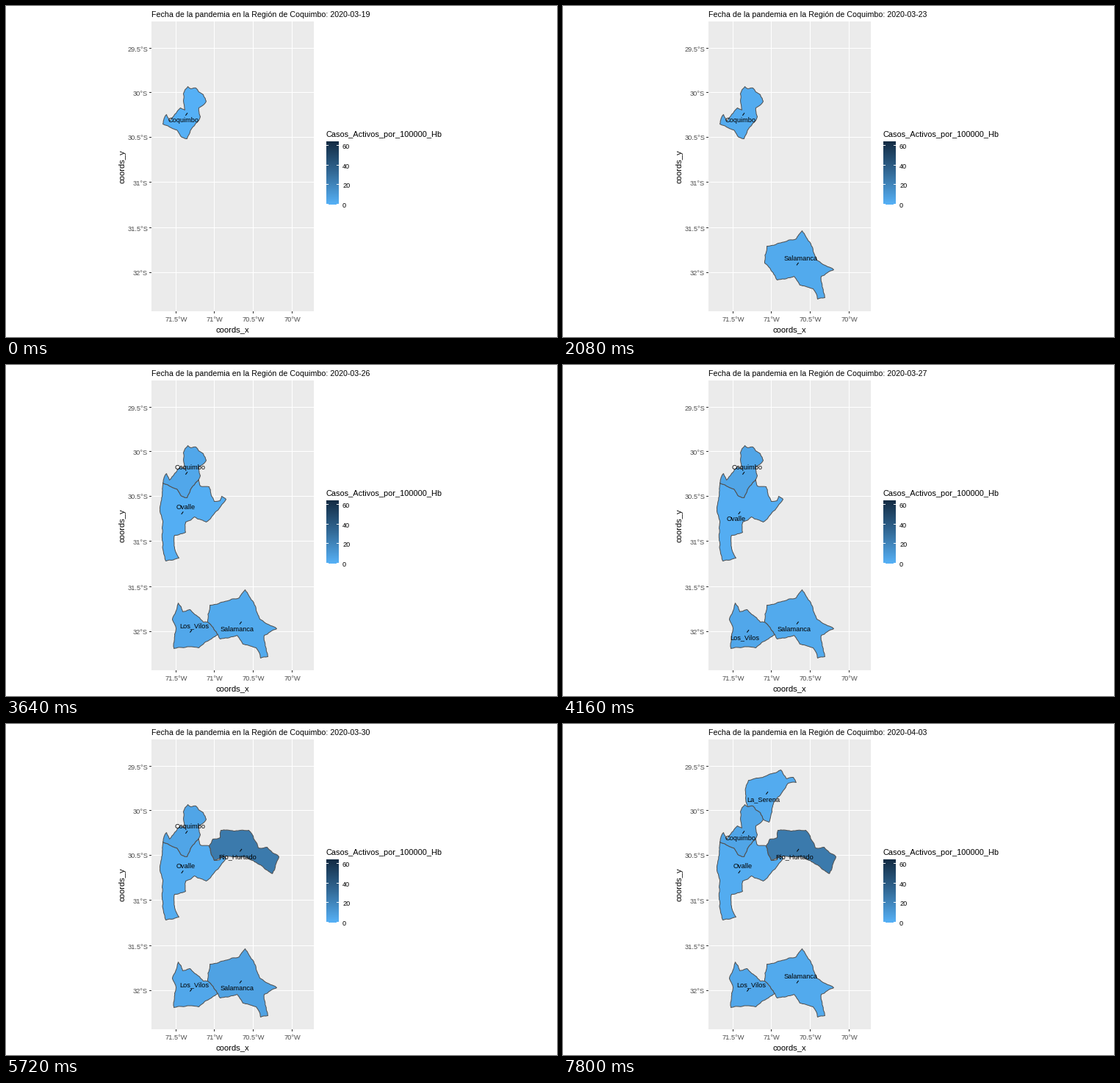
A matplotlib script that plays this animation: 750 px wide and 450 px high, repeating every 8000 ms.

```python
import numpy as np
import matplotlib.pyplot as plt
from matplotlib.animation import FuncAnimation
from matplotlib.colors import LinearSegmentedColormap
from matplotlib.patches import Polygon, Rectangle

W, H, DPI = 750, 450, 100
STEP, DAY, LOOP = 40, 520, 8000
PX = 72 / DPI
MAX_RATE = 64

plt.rcParams["font.family"] = "Liberation Sans"
fig = plt.figure(figsize=(W / DPI, H / DPI), dpi=DPI, facecolor="white")
ax = fig.add_axes([0, 0, 1, 1])
ax.axis("off")

cmap = LinearSegmentedColormap.from_list("rate", ["#56B1F7", "#336B98", "#132B43"])


def text(x, y, s, size, color="black", ha="left", **kw):
    return ax.text(x, y, s, size=size * PX, color=color, ha=ha,
                   va=kw.pop("va", "baseline"), **kw)


def box(x, y, w, h, color, z=1):
    ax.add_patch(Rectangle((x, y), w, h, fc=color, lw=0, zorder=z, antialiased=False))


def roughen(pts):
    """Fractal coastline; the shift depends on place only, so shared edges match."""
    def split(a, b):
        size = np.hypot(*(b - a))
        if size < 3:
            return [a]
        m = (a + b) / 2
        k = m @ [12.99, 78.23]
        m = m + min(0.07 * size, 1.2) * np.array([np.sin(k), np.cos(1.7 * k)])
        return split(a, m) + split(m, b)

    pts = np.array(pts, float)
    edges = zip(pts, np.roll(pts, -1, axis=0))
    return np.array([p for a, b in edges for p in split(a, b)]) + 0.5


class Commune:
    """Area and label; sides says per day, from the first, if the label is (a)bove or (b)elow."""

    def __init__(self, name, pts, anchor, first, sides, rate):
        self.anchor, self.first, self.sides, self.rate = anchor, first, sides, rate
        x, y = anchor
        self.area = ax.add_patch(Polygon(roughen(pts), ec="#505050", lw=PX,
                                         zorder=3, snap=False))
        self.tick, = ax.plot([x - 1, x + 1], [y + 1.5, y - 1.2], color="black",
                             lw=PX, zorder=4)
        self.label = text(x, y, name, 9.2, ha="center", zorder=5)

    def show(self, day):
        age = day - self.first
        for part in (self.area, self.tick, self.label):
            part.set_visible(age >= 0)
        if age >= 0:
            s = 1 if self.sides[age] == "b" else -1
            x, y = self.anchor
            self.label.set_position((x - 4.5 * s, y + 8 * s + 3.3))
            self.area.set_facecolor(cmap(self.rate(age) / MAX_RATE))


# Panel, grid and axes
box(198, 21, 221, 394, "#EBEBEB")
for k in range(4):
    x = int(231 + 52.7 * k)
    box(x, 21, 1, 394, "white")
    box(x, 415, 1, 3, "#333333")
    text(x + 0.5, 429.3, f"{71.5 - k / 2:g}°W", 9.3, "#4D4D4D", "center")
for k in range(6):
    y = int(57 + 60.4 * k + 0.15 * k * k)
    box(198, y, 221, 1, "white")
    box(195, y, 3, 1, "#333333")
    text(193, y + 4.5, f"{29.5 + k / 2:g}°S", 9.3, "#4D4D4D", "right")
text(308.5, 443, "coords_x", 11.2, ha="center")
text(158, 218.5, "coords_y", 11.2, ha="center", va="center", rotation=90)
title = text(198, 15, "", 10.58)

# Colour bar
text(435, 178, "Casos_Activos_por_100000_Hb", 11)
ax.imshow(np.linspace(1, 0, 256)[:, None], cmap=cmap, aspect="auto",
          extent=(436, 453, 270, 184), zorder=2)
for v in range(0, 61, 20):
    y = 269.6 - 1.34 * v
    for x in (436, 450):
        box(x, int(y), 3, 1, "white", 3)
    text(458, y + 4.5, str(v), 9.2)

# Borders shared by two neighbours
south_bay = [(213, 160), (232, 168), (239, 178), (246, 180), (253, 165), (262, 155)]
north_bay = [(251, 112), (258, 111), (268, 120), (272, 129)]
sierra = [(276, 165), (283, 185)]
coast_range = [(274, 349), (288, 366)]

ovalle = south_bay + [(264, 164)] + sierra + [
    (291, 184), (293, 178), (299, 182), (286, 198), (272, 213), (256, 206),
    (244, 213), (244, 227), (229, 231), (229, 249), (235, 262), (217, 266),
    (213, 241), (213, 214), (209, 198), (212, 178)]
serena = north_bay + [
    (280, 133), (286, 107), (298, 92), (306, 80), (317, 79), (313, 72),
    (304, 74), (296, 62), (280, 68), (252, 76), (248, 92)]
coquimbo = [(218, 147), (222, 156), (237, 138), (243, 141), (241, 119),
            (247, 109)] + north_bay + [(262, 138), (264, 150)] + south_bay[::-1]
hurtado = sierra + [
    (300, 179), (327, 181), (343, 190), (362, 203), (371, 180), (355, 167),
    (343, 168), (330, 144), (292, 144), (291, 154), (281, 156)]
vilos = coast_range + [
    (279, 372), (262, 384), (228, 385), (231, 358), (226, 346), (234, 323),
    (240, 335), (250, 332), (268, 349)]
salamanca = coast_range + [
    (291, 372), (314, 367), (322, 379), (340, 384), (346, 398), (356, 396),
    (351, 367), (368, 358), (345, 345), (337, 323), (325, 305), (317, 316),
    (277, 326)]

communes = [
    Commune("Ovalle", ovalle, (240, 201), 5, "bbabbbabbaa",
            lambda age: min(0.9 + 0.3 * age, 2.6)),
    Commune("La_Serena", serena, (277.7, 93.7), 12, "aabb",
            lambda age: 0.5 + 0.8 * age),
    Commune("Coquimbo", coquimbo, (245.7, 147), 0, "bababbbaaabaabab",
            lambda age: min(0.5 + 0.6 * age, 5.5)),
    Commune("Rio_Hurtado", hurtado, (319.7, 171.5), 9, "bbbbbbb",
            lambda age: 25),
    Commune("Los_Vilos", vilos, (251.7, 361.7), 7, "ababaaaaa",
            lambda age: 4.7),
    Commune("Salamanca", salamanca, (319.3, 350.5), 1, "abaaabbbbabbaaa",
            lambda age: 6.8 if 9 <= age < 13 else 3.4),
]
ax.set(xlim=(0, W), ylim=(H, 0))


def draw(i):
    day = i * STEP // DAY
    month, d = (3, 19 + day) if day < 13 else (4, day - 12)
    title.set_text("Fecha de la pandemia en la Región de Coquimbo: "
                   f"2020-{month:02d}-{d:02d}")
    for c in communes:
        c.show(day)
    return []


anim = FuncAnimation(fig, draw, frames=LOOP // STEP, interval=STEP,
                     repeat=True, repeat_delay=0, blit=False)
plt.show()
```
